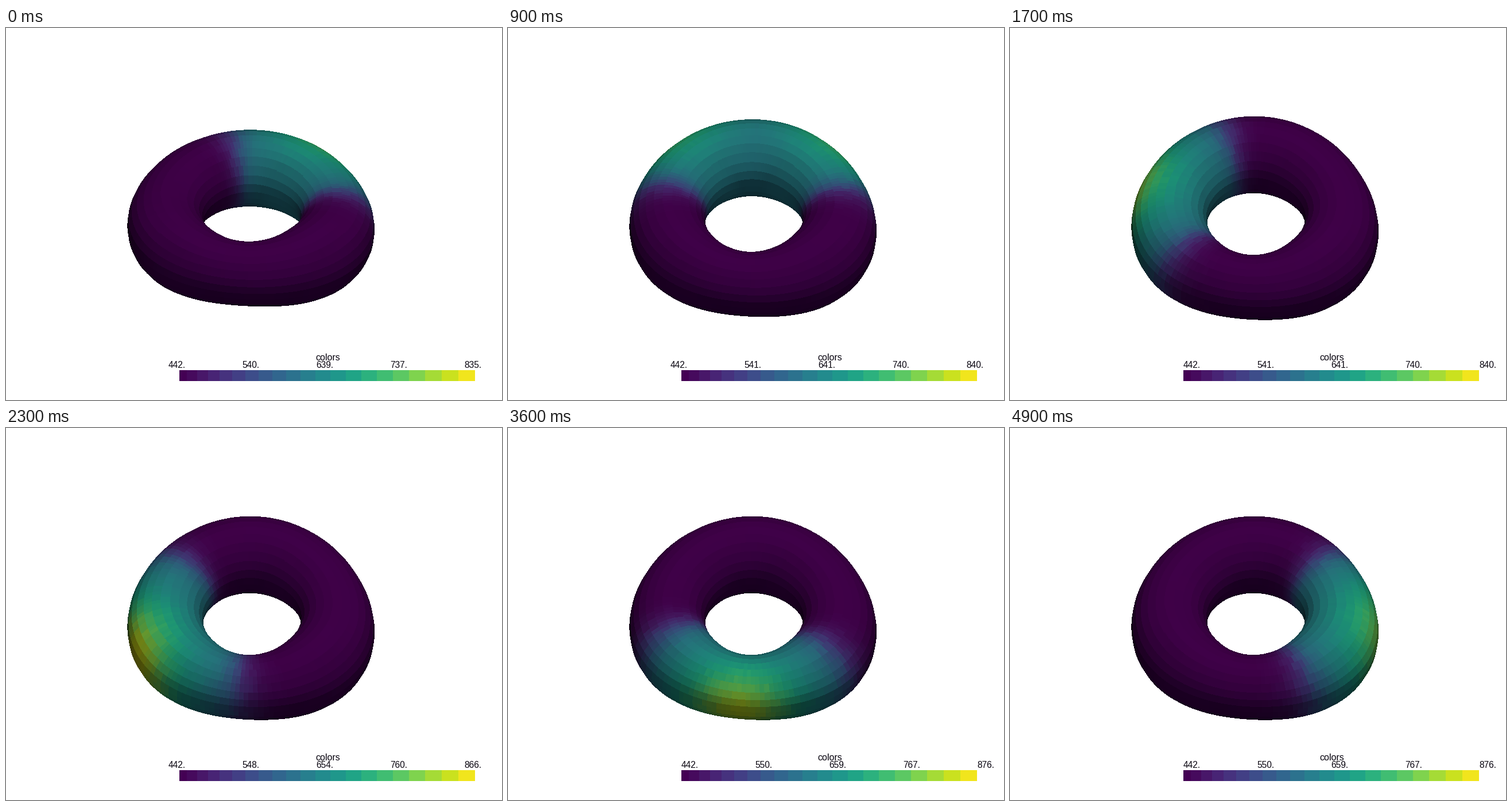
Recreate the animation shown at these times as a matplotlib script. Size 864x648 px, loop 5000 ms.

```python
import numpy as np
import matplotlib.pyplot as plt
from matplotlib.animation import FuncAnimation
from matplotlib.collections import PolyCollection
from matplotlib.patches import Rectangle

W, H, DPI = 864, 648, 100
FRAMES, INTERVAL = 50, 100
CENTER_X, CENTER_Y = 427, 336
NU, NV = 150, 26
BAR_LEFT, BAR_WIDTH, BAR_STEPS = 302, 515, 21
TILT_FRAMES = 12

plt.rcParams["font.family"] = "Liberation Sans"
viridis = plt.get_cmap("viridis")


def ease(x):
    x = np.clip(x, 0, 1)
    return x * x * (3 - 2 * x)


def bump(x, center, width):
    return np.exp(-((x - center) / width) ** 2)


def wrap(deg):
    return (deg + 180) % 360 - 180


def light(azimuth, elevation, strength, tint=(1, 1, 1)):
    az, el = np.radians([azimuth, elevation])
    direction = np.array([np.cos(el) * np.sin(az), np.sin(el),
                          np.cos(el) * np.cos(az)])
    return direction, strength * np.array(tint)


LIGHTS = [
    light(10, 50, 0.75, (1, 0.97, 0.90)),
    light(0, -75, 0.25, (0.92, 0.96, 1)),
    light(110, 0, 0.21),
    light(-110, 0, 0.21),
    light(0, 0, 0.25),
]

# Ring surface in plan coordinates: x right, y towards the viewer, z up
phi, tube = np.meshgrid(np.linspace(0, 2 * np.pi, NU + 1),
                        np.linspace(-np.pi, np.pi, NV + 1), indexing="ij")
ring_r = (149.5 + 3 * np.sin(phi) + 0.3 * np.cos(phi)
          + 1.2 * np.sin(2 * phi) + 2.7 * np.sin(3 * phi))
tube_r = (63.9 - 2 * np.sin(phi) + 1.3 * np.sin(2 * phi)
          + 1.6 * np.cos(2 * phi) + 3.2 * np.sin(3 * phi)
          - np.cos(3 * phi) - np.cos(4 * phi))
reach = ring_r + tube_r * np.cos(tube)
PX, PY, PZ = reach * np.cos(phi), reach * np.sin(phi), tube_r * np.sin(tube)

# Slightly uneven cell centres give the ragged colour borders
rng = np.random.default_rng(4)
CELL_PHI = (np.degrees(phi[:-1, :-1] + phi[1:, 1:]) / 2
            + rng.uniform(-1.5, 1.5, (NU, NV)))
CELL_TUBE = (np.degrees(tube[:-1, :-1] + tube[1:, 1:]) / 2
             + rng.uniform(-3, 3, (NU, NV)))


def corners(a):
    return np.stack([a[:-1, :-1], a[1:, :-1], a[1:, 1:], a[:-1, 1:]], axis=2)


def heat(i):
    """Hot zone sweeping round the ring; it splits in two at the far side."""
    wobble = 24 * np.sin(2 * np.pi * i / 28) * (1 - i / FRAMES)
    angle = -52 - 6.04 * i + wobble
    split, near = bump(i, 9, 4), bump(i, 28, 10)
    half_width = 50 + 29 * split + 12 * near
    peak = 0.38 - 0.06 * split + 0.23 * near

    d = np.abs(wrap(CELL_PHI - angle))
    plateau = 0.42 / (1 + np.exp((d - half_width) / 5.5))
    lobe = bump(d, 42 * split, 29) * bump(CELL_TUBE, 0, 82)
    return np.clip(plateau + peak * lobe, 0, 0.97)


def surface(i):
    el = np.radians(38 + 1.05 * min(i, TILT_FRAMES))
    up = PZ * np.cos(el) - PY * np.sin(el)
    toward = PY * np.cos(el) + PZ * np.sin(el)
    quads = corners(np.stack([PX, up, toward], axis=-1))

    normal = np.cross(quads[:, :, 3] - quads[:, :, 1],
                      quads[:, :, 2] - quads[:, :, 0])
    normal /= np.linalg.norm(normal, axis=-1, keepdims=True)
    shade = sum(np.clip(normal @ direction, 0, None)[..., None] * tint
                for direction, tint in LIGHTS)
    rgb = np.clip(viridis(heat(i))[..., :3] * shade, 0, 1)

    seen = normal[..., 2] > -0.05
    quads, rgb = quads[seen], rgb[seen]
    order = np.argsort(quads[:, :, 2].mean(axis=1))
    xy = quads[order, :, :2] * [1, -1] + [CENTER_X, CENTER_Y]
    return xy, rgb[order]


fig = plt.figure(figsize=(W / DPI, H / DPI), dpi=DPI, facecolor="white")
ax = fig.add_axes([0, 0, 1, 1])
ax.set_xlim(0, W)
ax.set_ylim(H, 0)
ax.axis("off")

body = PolyCollection([], edgecolors="none", antialiaseds=False)
ax.add_collection(body, autolim=False)

# Colour steps are narrow at the dark end and widen to the right
levels = np.linspace(0, 1, BAR_STEPS + 1) ** 1.2
for k, (lo, hi) in enumerate(zip(levels[:-1], levels[1:])):
    shade_at = 0.98 * (lo + (hi - lo) * k / (BAR_STEPS - 1))
    ax.add_patch(Rectangle((BAR_LEFT + BAR_WIDTH * lo, 596),
                           BAR_WIDTH * (hi - lo), 19, edgecolor="none",
                           facecolor=viridis(shade_at), antialiased=False))


def caption(x, y, text, px, ha):
    return ax.text(x, y, text, fontsize=px * 72 / DPI, ha=ha,
                   va="baseline", color="#08040f")


caption(561, 579, "colors", 16, "center")
labels = [caption(0, 592, "", 15.5, "left") for _ in range(5)]


def update(i):
    xy, rgb = surface(i)
    body.set_verts(xy)
    body.set_facecolor(rgb)

    growth = ease((i - 17) / 9.2)
    top = 835.4 + 4.4 * min(i / 6, 1) + 36 * growth
    # The labels jump sideways until the value range has settled
    shifted = growth == 1 or 0 < i % 12 < 9
    start = BAR_LEFT if shifted else BAR_LEFT - 19
    for k, label in enumerate(labels):
        label.set_x(start + k * BAR_WIDTH / 4)
        label.set_text(f"{442 + k * (top - 442) / 4:.0f}.")
    return [body, *labels]


anim = FuncAnimation(fig, update, frames=FRAMES, interval=INTERVAL,
                     repeat=True, repeat_delay=0, blit=False)
plt.show()
```
